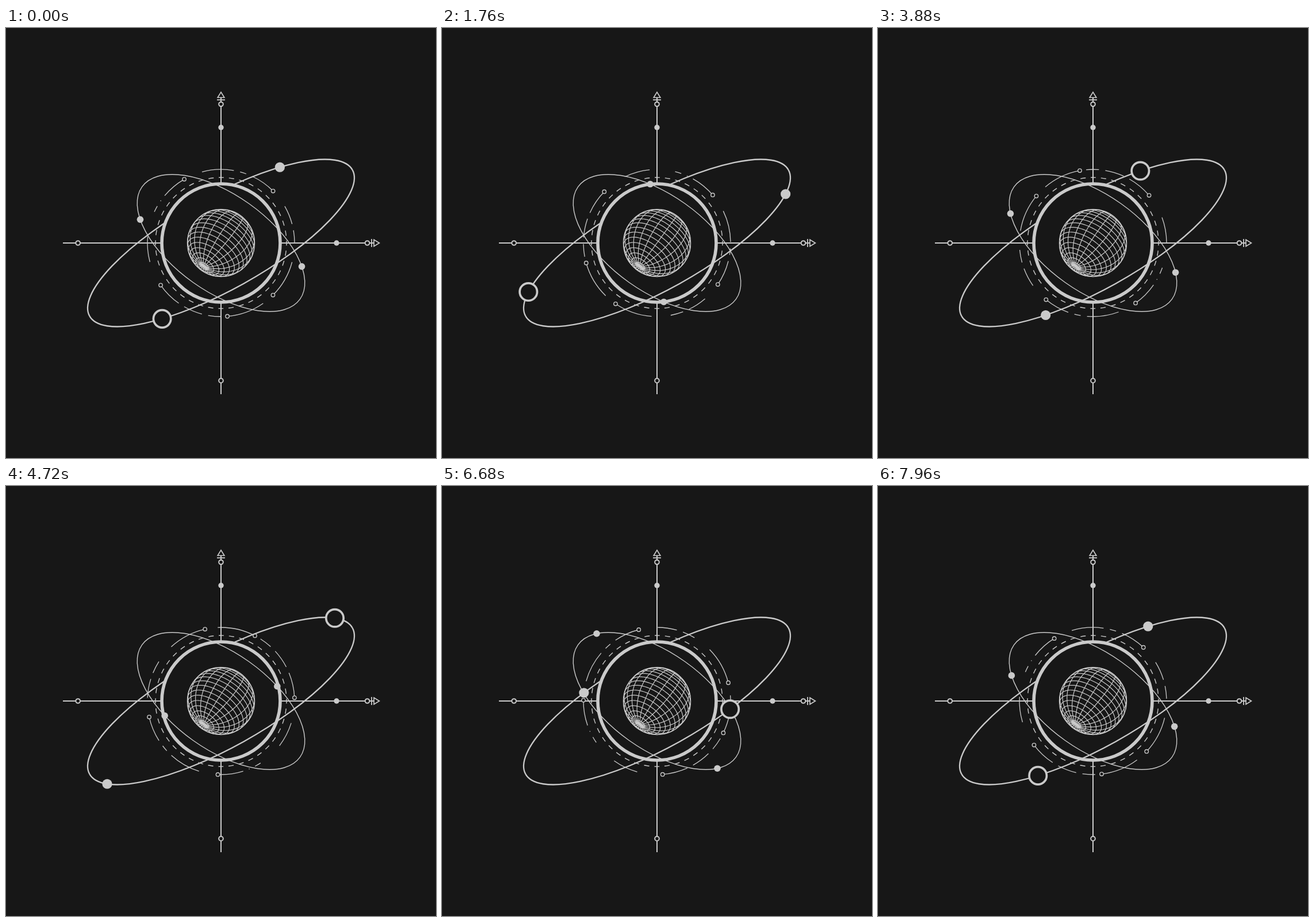
These frames come from a looping animation (748x748 px, 8000 ms). An HTML page with a canvas:

```html
<!DOCTYPE html>
<html lang="en">
<head>
<meta charset="utf-8">
<title>Orbits</title>
<style>
html, body { margin: 0; width: 100%; height: 100%; overflow: hidden; background: #171717; }
canvas { display: block; width: 748px; height: 748px; }
</style>
</head>
<body>
<canvas id="stage" width="748" height="748"></canvas>
<script>
const ctx = document.getElementById('stage').getContext('2d');
const INK = '#cacaca', PAPER = '#171717', C = 374, LOOP = 8000;
const rad = deg => deg * Math.PI / 180;

// Orbits in coordinates relative to the centre
const wide = { a: 261.6, b: 80.9, tilt: rad(-29.08) };
const narrow = { a: 168.6, b: 84, tilt: rad(35.4) };

// Start and end angles of the pieces of the turning ring
const arcs = [[15, 45], [55, 85], [90, 100], [105, 120], [125, 145], [165, 185], [205, 210],
  [214.7, 215.3], [220, 240], [255, 280], [285, 290], [295, 315], [330, 345], [350, 360]];
const knobs = [45, 85, 145, 240, 315];

function stroke(width) {
  ctx.lineWidth = width;
  ctx.strokeStyle = INK;
  ctx.stroke();
}

function line(width, ...pts) {
  ctx.beginPath();
  for (let i = 0; i < pts.length; i += 2) ctx.lineTo(pts[i], pts[i + 1]);
  stroke(width);
}

function disc(x, y, r, fill = INK, width = 0) {
  ctx.beginPath();
  ctx.arc(x, y, r, 0, 2 * Math.PI);
  ctx.fillStyle = fill;
  ctx.fill();
  if (width) stroke(width);
}

function orbit(o, width, from = 0, to = 360) {
  ctx.beginPath();
  ctx.ellipse(0, 0, o.a, o.b, o.tilt, rad(from), rad(to));
  stroke(width);
}

function onOrbit(o, deg) {
  const p = o.a * Math.cos(rad(deg)), q = o.b * Math.sin(rad(deg));
  const c = Math.cos(o.tilt), s = Math.sin(o.tilt);
  return [p * c - q * s, p * s + q * c];
}

// Half axis pointing right, then turned; knob is the distance of its open circle
function axis(turn, knob, length, arrow) {
  ctx.save();
  ctx.rotate(rad(turn));
  line(2, 103, 0, length, 0);
  disc(knob, 0, 3.8, PAPER, 2);
  if (arrow) {
    disc(201, 0, 4.7);
    line(1.8, knob + 7.5, -7, knob + 7.5, 7);
    ctx.beginPath();
    ctx.moveTo(length, -5.8);
    ctx.lineTo(length + 9.4, 0);
    ctx.lineTo(length, 5.8);
    ctx.closePath();
    stroke(1.7);
  }
  ctx.restore();
}

function dashedRings(turn) {
  const dash = rad(4.5) * 114;
  ctx.setLineDash([dash, dash]);
  ctx.lineDashOffset = dash / 2;
  ctx.beginPath();
  ctx.arc(0, 0, 114, 0, 2 * Math.PI);
  stroke(1.4);
  ctx.setLineDash([]);

  for (const [from, to] of arcs) {
    ctx.beginPath();
    ctx.arc(0, 0, 128, rad(from + turn), rad(to + turn));
    stroke(1.3);
  }
  for (const k of knobs) {
    const a = rad(k + turn);
    disc(128 * Math.cos(a), 128 * Math.sin(a), 3.2, PAPER, 1.4);
  }
}

function globe(turn) {
  const R = 58.5;
  const pole = [-.508, .695, .509], side = [.807, .59, 0], front = [.3, -.411, .861];

  function curve(point, last) {
    let pen = false;
    for (let i = 0; i <= last; i += 3) {
      const [lat, lon] = point(i).map(rad);
      const [x, y, z] = pole.map((p, k) => R * (Math.cos(lat) * p +
        Math.sin(lat) * (Math.sin(lon) * side[k] + Math.cos(lon) * front[k])));
      if (z >= 0) pen ? ctx.lineTo(x, y) : ctx.moveTo(x, y);
      pen = z >= 0;
    }
  }

  ctx.beginPath();
  for (let lon = 0; lon < 360; lon += 18) curve(i => [i, lon - turn + 79.2], 180);
  for (let lat = 9; lat < 180; lat += 9) curve(i => [lat, i], 360);
  stroke(1.2);
  ctx.beginPath();
  ctx.arc(0, 0, R, 0, 2 * Math.PI);
  stroke(1.4);
}

function draw(now) {
  const turn = now % LOOP / LOOP * 360;
  ctx.setTransform(1, 0, 0, 1, 0, 0);
  ctx.fillStyle = PAPER;
  ctx.fillRect(0, 0, 748, 748);
  ctx.translate(C, C);

  axis(0, 254.5, 266, true);
  axis(-90, 241.5, 253, true);
  axis(90, 239.4, 263);
  axis(180, 248.8, 275);
  dashedRings(turn);

  const ball = (turn + 305.9) % 360, hoop = (ball + 180) % 360;
  function bodies(isFront) {
    if (ball < 180 === isFront) disc(...onOrbit(wide, ball), 8.6);
    if (hoop < 180 === isFront) disc(...onOrbit(wide, hoop), 15.2, PAPER, 3.7);
  }

  // Far half of the wide orbit passes behind the central disc
  orbit(wide, 2.3, 180, 360);
  bodies(false);
  disc(0, 0, 103, PAPER, 5.6);
  globe(turn);
  orbit(narrow, 1.4);
  for (const start of [145.1, 325.1]) disc(...onOrbit(narrow, start - turn), 5.8);
  orbit(wide, 2.3, 0, 180);
  bodies(true);
}

const start = performance.now();
(function tick() {
  draw(performance.now() - start);
  requestAnimationFrame(tick);
})();
</script>
</body>
</html>
```
